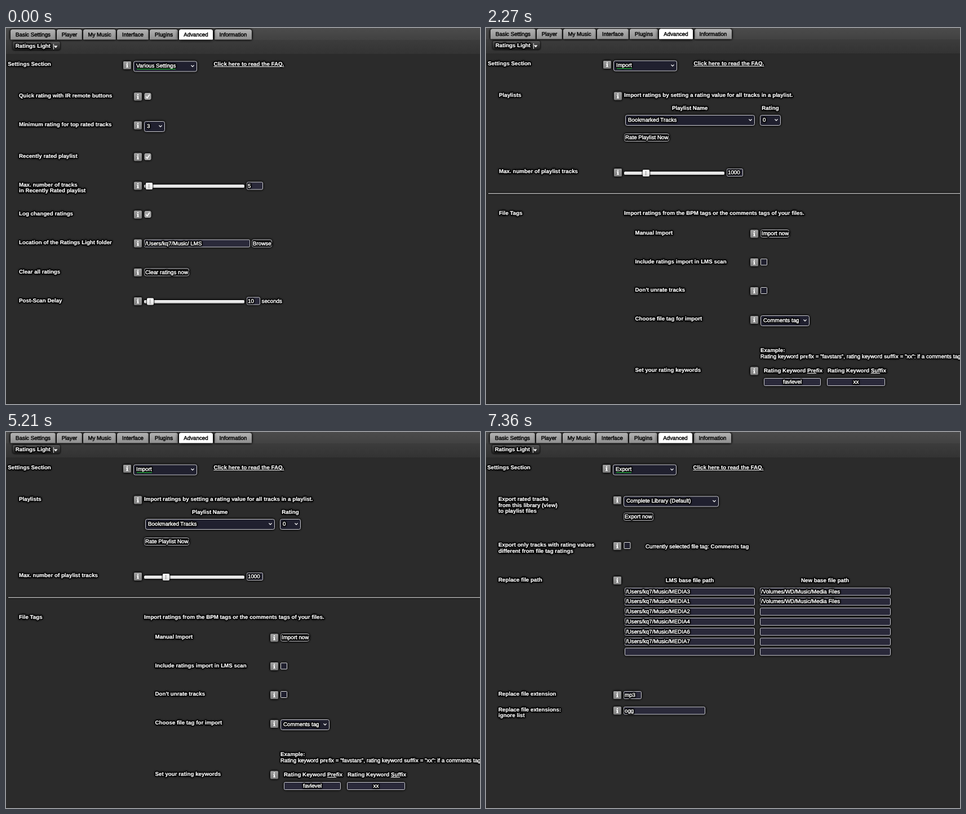
These frames come from a looping animation (841x666 px, 8 s). An HTML page with a canvas:

```html
<!DOCTYPE html>
<html lang="en">
<head>
<meta charset="utf-8">
<title>Plugin settings</title>
<style>
html, body { margin: 0; width: 100%; height: 100%; overflow: hidden; background: #2b2b2b; }
canvas { display: block; }
</style>
</head>
<body>
<canvas id="stage" width="841" height="666"></canvas>
<script>
const ctx = document.getElementById('stage').getContext('2d');
const LOOP = 8000;
const FIELD = '#2a293a', MENU = '#20202f', BUTTON = '#121212', EDGE = '#cfcfd4';

function gradient(top, bottom, from, to) {
  const g = ctx.createLinearGradient(0, top, 0, bottom);
  g.addColorStop(0, from);
  g.addColorStop(1, to);
  return g;
}

// Painting twice makes the soft black rim dense.
function glow(blur, paint) {
  ctx.save();
  ctx.shadowColor = '#000';
  ctx.shadowBlur = blur;
  paint();
  paint();
  ctx.restore();
}

function path(points) {
  ctx.beginPath();
  points.forEach(([x, y]) => ctx.lineTo(x, y));
}

// Text is placed by its left edge and the middle of its capitals; returns the right edge.
function text(str, x, midY, { bold = false, color = '#fff', halo = true, align = 'left' } = {}) {
  ctx.font = `${bold ? 'bold ' : ''}9.77px "Liberation Sans", Arial, sans-serif`;
  ctx.textAlign = align;
  ctx.lineJoin = 'round';
  const y = midY + 3.5;
  if (halo) {
    glow(2.5, () => {
      ctx.strokeStyle = 'rgba(0,0,0,.75)';
      ctx.lineWidth = 2.8;
      ctx.strokeText(str, x, y);
    });
  }
  ctx.fillStyle = ctx.strokeStyle = color;
  ctx.fillText(str, x, y);
  ctx.lineWidth = bold ? .2 : .45;
  ctx.strokeText(str, x, y);
  return x + ctx.measureText(str).width;
}

const label = (str, x, y) => text(str, x, y, { bold: true });
const heading = (str, x, y) => text(str, x, y, { bold: true, align: 'center' });

function lines(x, y, ...rows) {
  rows.forEach((row, i) => label(row, x, y + i * 10.7));
}

function box(x, y, w, h, fill, radius = 2, edge = EDGE) {
  ctx.beginPath();
  ctx.roundRect(x + .5, y + .5, w - 1, h - 1, radius);
  glow(5, () => {
    ctx.fillStyle = fill;
    ctx.fill();
  });
  ctx.strokeStyle = edge;
  ctx.lineWidth = 1;
  ctx.stroke();
}

function field(x, y, w, str = '') {
  box(x, y, w, 14, FIELD);
  if (str) text(str, x + 2, y + 6.5);
}

function button(x, y, w, str) {
  box(x, y, w, 14, BUTTON, 3);
  text(str, x + 2, y + 6.5);
}

function menu(x, y, w, str) {
  box(x, y, w, 19, MENU, 3);
  text(str, x + 5, y + 8.3);
  const cx = x + w - 8, cy = y + 8.7;
  path([[cx - 2.5, cy - 1.2], [cx, cy + 1.4], [cx + 2.5, cy - 1.2]]);
  ctx.strokeStyle = '#fff';
  ctx.lineWidth = 1.2;
  ctx.stroke();
}

function info(cx, cy) {
  glow(4, () => {
    ctx.fillStyle = gradient(cy - 7, cy + 7, '#a0a0a0', '#7d7d7d');
    ctx.beginPath();
    ctx.roundRect(cx - 7, cy - 7, 14, 14, 2);
    ctx.fill();
  });
  ctx.fillStyle = '#fff';
  ctx.fillRect(cx - 1, cy - 4.5, 2, 2);
  ctx.fillRect(cx - 2, cy - 1.5, 3, 1);
  ctx.fillRect(cx - 1, cy - 1.5, 2, 5.5);
  ctx.fillRect(cx - 2, cy + 3, 4, 1);
}

function checkbox(cx, cy, checked) {
  if (!checked) {
    box(cx - 6, cy - 6, 12, 12, MENU, 1, '#e4e4e4');
    return;
  }
  box(cx - 6, cy - 6, 12, 12, '#a2a2a2', 2, '#b4b4b4');
  path([[cx - 3.2, cy + .3], [cx - 1, cy + 3], [cx + 3.3, cy - 3.3]]);
  ctx.strokeStyle = '#fff';
  ctx.lineWidth = 1.7;
  ctx.stroke();
}

function slider(cy, thumbX) {
  glow(4, () => {
    ctx.fillStyle = gradient(cy - 3, cy + 3, '#fff', '#d4d4d4');
    ctx.beginPath();
    ctx.roundRect(245, cy - 2.5, 178, 5.5, 2);
    ctx.fill();
  });
  glow(3, () => {
    ctx.fillStyle = gradient(cy - 6, cy + 6, '#fff', '#dcdcdc');
    ctx.beginPath();
    ctx.roundRect(thumbX - 6, cy - 6, 12, 12, 2);
    ctx.fill();
  });
  ctx.fillStyle = '#999';
  ctx.fillRect(thumbX - 1, cy - 4, 1.2, 8);
}

function tab(x, right, str) {
  const active = str === 'Advanced';
  ctx.beginPath();
  ctx.roundRect(x, 1.5, right - x, 18, [4, 4, 1, 1]);
  glow(active ? 6 : 4, () => {
    ctx.fillStyle = active ? '#fff' : gradient(1, 20, '#b4b4b4', '#8e8e8e');
    ctx.fill();
  });
  text(str, (x + right) / 2, 10, { color: '#000', halo: false, align: 'center' });
}

function background(dy) {
  ctx.fillStyle = '#2b2b2b';
  ctx.fillRect(0, 0, 841, 666);
  ctx.fillStyle = gradient(0, 20 + dy, '#4b4b4b', '#424242');
  ctx.fillRect(0, 0, 841, 20 + dy);
  ctx.fillStyle = gradient(20 + dy, 45 + dy, '#3c3c3c', '#333');
  ctx.fillRect(0, 20 + dy, 841, 25);
  ctx.fillStyle = '#242424';
  ctx.fillRect(0, 664, 841, 1);
}

function header(section, underline, dx, dy) {
  background(dy);
  ctx.save();
  ctx.translate(dx, dy);
  tab(8, 88, 'Basic Settings');
  tab(90, 135, 'Player');
  tab(137, 195, 'My Music');
  tab(197, 253, 'Interface');
  tab(255, 305, 'Plugins');
  tab(370, 436, 'Information');
  tab(307, 367, 'Advanced');

  glow(3, () => {
    ctx.fillStyle = gradient(23, 38, '#555', '#202020');
    ctx.beginPath();
    ctx.roundRect(12, 23, 84, 15, 3);
    ctx.fill();
  });
  label('Ratings Light', 16.7, 30);
  ctx.fillStyle = '#ddd';
  ctx.fillRect(84, 27, 1, 10);
  path([[85, 30.5], [91.5, 30.5], [88.2, 34.5]]);
  ctx.fillStyle = '#fff';
  ctx.fill();

  label('Settings Section', 3.3, 62.5);
  info(215, 65);
  menu(226, 57.5, 113, section);
  ctx.fillStyle = '#1d9a34';
  ctx.fillRect(232, 71, underline, 1.5);
  const end = label('Click here to read the FAQ.', 368.5, 62.5);
  ctx.fillStyle = '#fff';
  ctx.fillRect(368.5, 67, end - 368.5, 1);
  ctx.restore();
}

function variousPage() {
  header('Various Settings', 69, 0, 1);
  label('Quick rating with IR remote buttons', 23, 119.5);
  label('Minimum rating for top rated tracks', 23, 170.5);
  label('Recently rated playlist', 23, 226.3);
  lines(23, 277, 'Max. number of tracks', 'in Recently Rated playlist');
  label('Log changed ratings', 23, 328.5);
  label('Location of the Ratings Light folder', 23, 379.5);
  label('Clear all ratings', 23, 431);
  label('Post-Scan Delay', 23, 482);
  [121.5, 172.5, 228.5, 279.5, 330.5, 381.5, 433, 484].forEach(y => info(234, y));
  [121, 228, 330].forEach(y => checkbox(251.5, y, true));
  menu(245, 165, 37, '3');
  slider(280, 254);
  field(427, 272.5, 29, '5');
  field(245, 374.5, 188, '/Users/kq7/Music/ LMS');
  button(436, 374.5, 36, 'Browse');
  button(245, 425.5, 80, 'Clear ratings now');
  slider(484.5, 256);
  field(427, 476.5, 24, '10');
  text('seconds', 453.5, 483.5);
}

function keywordHeading(str, x, underlineX) {
  label(str, x, 606.5);
  ctx.fillStyle = '#fff';
  ctx.fillRect(underlineX, 611, 16, 1);
}

function importPage() {
  header('Import', 27, 0, 0);
  label('Playlists', 23, 118.5);
  info(234, 120.5);
  label('Import ratings by setting a rating value for all tracks in a playlist.', 245, 118.5);
  heading('Playlist Name', 361.7, 141.5);
  heading('Rating', 504.5, 141.5);
  menu(247, 154, 230, 'Bookmarked Tracks');
  menu(486, 154, 37, '0');
  button(245, 187, 80, 'Rate Playlist Now');

  label('Max. number of playlist tracks', 23, 253.5);
  info(234, 256);
  slider(257, 284);
  field(427, 249, 29, '1000');

  glow(3, () => {
    ctx.fillStyle = '#a8a8a8';
    ctx.fillRect(4, 292.5, 837, 1.5);
  });

  label('File Tags', 23, 327.5);
  label('Import ratings from the BPM tags or the comments tags of your files.', 245, 327.5);
  label('Manual Import', 264.5, 362.5);
  label('Include ratings import in LMS scan', 264.5, 413);
  label('Don\'t unrate tracks', 264.5, 463.5);
  label('Choose file tag for import', 264.5, 514.5);
  label('Set your rating keywords', 264.5, 605);
  [364.5, 415, 466, 517, 607.5].forEach(y => info(476, y));
  button(487, 357, 51, 'Import now');
  checkbox(493, 414.5, false);
  checkbox(493, 465, false);
  menu(487, 509, 87, 'Comments tag');

  label('Example:', 487, 570.5);
  let x = text('Rating keyword ', 487, 581);
  x = label('pre', x, 581);
  x = text('fix = "favstars", rating keyword ', x, 581);
  x = label('suffix', x, 581);
  text(' = "xx": if a comments tag', x, 581);

  keywordHeading('Rating Keyword Prefix', 493, 570);
  keywordHeading('Rating Keyword Suffix', 606, 683);
  field(493, 620, 101);
  field(605, 620, 103);
  text('favlevel', 543.5, 626.5, { align: 'center' });
  text('xx', 656.5, 626.5, { align: 'center' });
}

function exportPage() {
  header('Export', 27, -1, 0);
  lines(22, 118.5, 'Export rated tracks', 'from this library (view)', 'to playlist files');
  info(233, 121);
  menu(244, 113.5, 169, 'Complete Library (Default)');
  button(244, 143, 53, 'Export now');

  lines(22, 199.5, 'Export only tracks with rating values', 'different from file tag ratings');
  info(233, 202);
  checkbox(250.5, 201, false);
  label('Comments tag', text('Currently selected file tag: ', 283, 202), 202);

  label('Replace file path', 22, 261);
  info(233, 263);
  heading('LMS base file path', 361.5, 262.5);
  heading('New base file path', 601.5, 262.5);
  [3, 1, 2, 4, 6, 7, 0].forEach((disk, i) => {
    const y = 275.7 + i * 17.75;
    field(246, y, 231, disk ? `/Users/kq7/Music/MEDIA${disk}` : '');
    field(486, y, 232, i < 2 ? '/Volumes/WD/Music/Media Files' : '');
  });

  label('Replace file extension', 22, 463.5);
  info(233, 466);
  field(244, 459, 32, 'mp3');
  lines(22, 491, 'Replace file extensions:', 'ignore list');
  info(233, 493.5);
  field(244, 486.5, 145, 'ogg');
}

const pages = [[0, variousPage], [500, importPage], [6390, exportPage]];
let shown = null;

function tick() {
  const time = performance.now() % LOOP;
  const page = pages.filter(([start]) => time >= start).pop()[1];
  if (page !== shown) {
    shown = page;
    page();
  }
  requestAnimationFrame(tick);
}

ctx.textRendering = 'geometricPrecision';
tick();
</script>
</body>
</html>
```
